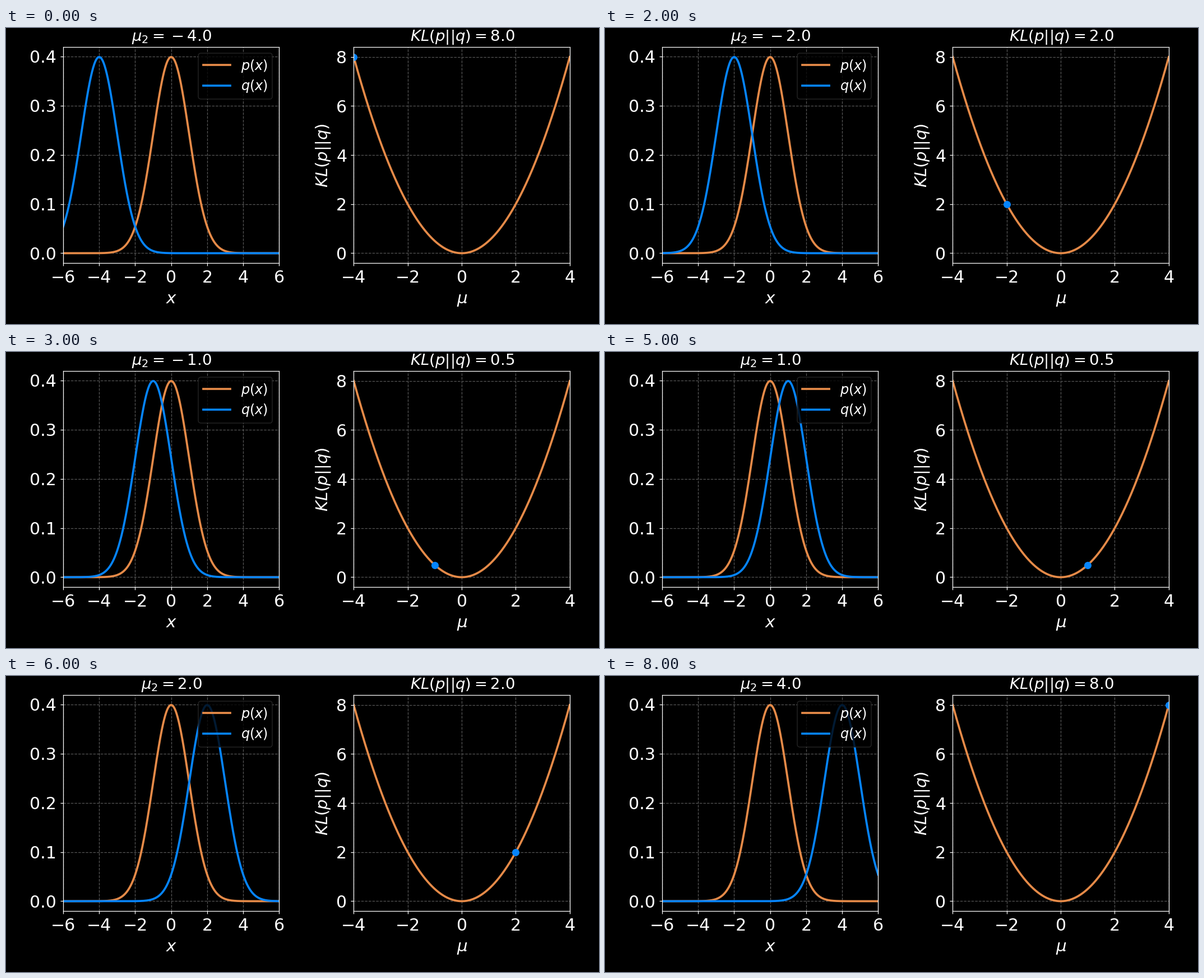
Animation, 1058 px wide and 529 px high, one loop 9000 ms. Source, as a matplotlib script:

```python
import numpy as np
import matplotlib.pyplot as plt
from matplotlib.animation import FuncAnimation

W, H, DPI = 1058, 529, 105.8
PX = 72 / DPI  # points per pixel
ORANGE, BLUE, GRID, FRAME = "#e58a48", "#0684fc", "#555555", "#2a2a2a"
TOP, BOTTOM, SIDE = 34.3, 420.0, 385.4

plt.rcParams.update({
    "font.family": "DejaVu Sans",
    "mathtext.fontset": "dejavusans",
    "text.color": "white",
    "axes.edgecolor": "white",
    "axes.facecolor": "black",
    "axes.linewidth": 1.25 * PX,
})


def normal(x, mean):
    return np.exp(-(x - mean) ** 2 / 2) / np.sqrt(2 * np.pi)


def divergence(mean):
    return mean ** 2 / 2


def make_axes(left, xlim, peak, xticks, yticks):
    ax = fig.add_axes([left / W, 1 - BOTTOM / H, SIDE / W, (BOTTOM - TOP) / H])
    ax.set_xlim(*xlim)
    ax.set_ylim(-0.05 * peak, 1.05 * peak)
    ax.set_xticks(xticks)
    ax.set_yticks(yticks)
    ax.tick_params(colors="white", labelsize=30 * PX, length=5.4 * PX,
                   width=1.25 * PX, pad=6.8 * PX)
    ax.grid(True, color=GRID, linestyle="--", linewidth=1.25 * PX)
    ax.set_axisbelow(True)
    return ax


def label(x, y, text, size, ha="center", va="baseline", **kw):
    return fig.text(x / W, 1 - y / H, text, fontsize=size * PX,
                    ha=ha, va=va, **kw)


fig = plt.figure(figsize=(10, 5), dpi=DPI, facecolor="black")
line = dict(linewidth=3.75 * PX)

x = np.linspace(-6, 6, 601)
left = make_axes(102, (-6, 6), normal(0, 0),
                 np.arange(-6, 7, 2), np.arange(5) / 10)
left.plot(x, normal(x, 0), color=ORANGE, label="$p(x)$", **line)
q_line, = left.plot(x, normal(x, -4), color=BLUE, label="$q(x)$", **line)
legend = left.legend(loc="upper right", bbox_to_anchor=(1, 1.003),
                     fontsize=24 * PX, borderpad=0.36, labelspacing=0.36,
                     handletextpad=0.77, facecolor="black",
                     edgecolor=FRAME, framealpha=0.8)
legend.get_frame().set_linewidth(1.5 * PX)

mu = np.linspace(-4, 4, 401)
right = make_axes(620.4, (-4, 4), divergence(4),
                  np.arange(-4, 5, 2), np.arange(0, 9, 2))
right.plot(mu, divergence(mu), color=ORANGE, **line)
dot, = right.plot([-4], [8], "o", color=BLUE, markersize=11.5 * PX,
                  markeredgewidth=1.5 * PX)

label(295, 491.5, "$x$", 29.5)
label(813.5, 491.5, r"$\mu$", 29.5)
label(582, 228, "$KL(p||q)$", 29.3, ha="right", va="center", rotation=90)
mean_title = label(295.5, 23.3, "", 27.6)
kl_title = label(814, 23.3, "", 27.6)


def update(i):
    mean = i - 4.0
    q_line.set_ydata(normal(x, mean))
    dot.set_data([mean], [divergence(mean)])
    # the empty group keeps the wide spacing around the minus sign
    mean_title.set_text(rf"$\mu_2 = {{}}{mean:.1f}$" if mean < 0
                        else rf"$\mu_2 = {mean:.1f}$")
    kl_title.set_text(f"$KL(p||q) = {divergence(mean):.1f}$")
    return q_line, dot, mean_title, kl_title


anim = FuncAnimation(fig, update, frames=9, interval=1000, repeat=True,
                     repeat_delay=0, init_func=lambda: update(0))
plt.show()
```
